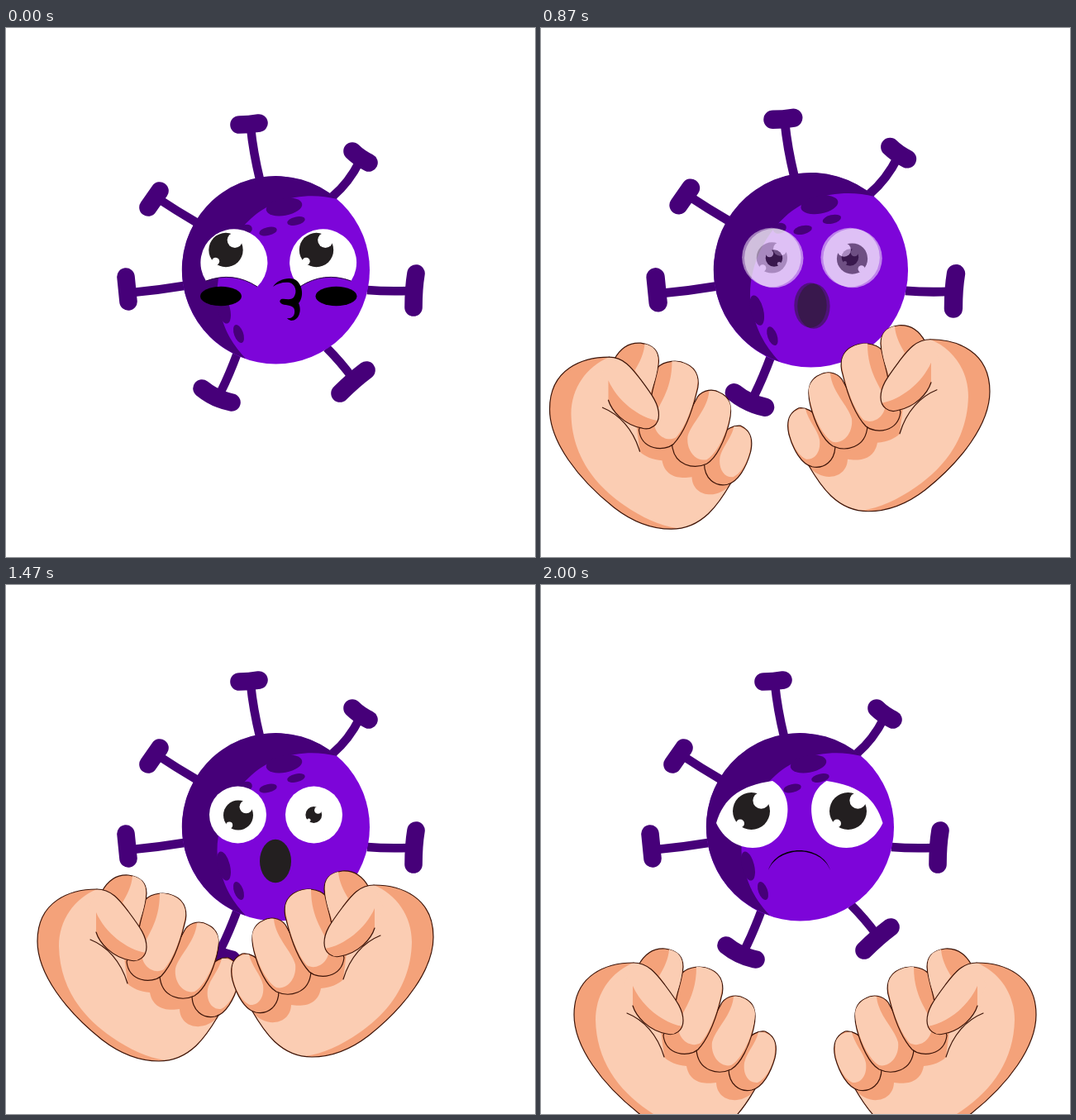
An HTML page that plays this animation: 640x640 px, repeating every 3.01 s.

```html
<!DOCTYPE html>
<html lang="en">
<head>
<meta charset="utf-8">
<title>Virus and fists</title>
<style>
  html, body { margin: 0; width: 100%; height: 100%; overflow: hidden; background: #fff; }
  svg { display: block; width: 100%; height: 100%; }
  .light { fill: #fbcdb3; }
  .shade { fill: #f4a27a; }
  .line, .edged { stroke: #3d1408; stroke-width: 1.2; stroke-linecap: round; }
  .line { fill: none; }
  .dark { fill: #460079; }
  .ink { fill: #231f20; }
  .white { fill: #fff; }
  .stems, .caps { fill: none; stroke: #460079; }
  .stems { stroke-width: 10.5; }
  .caps { stroke-width: 21.6; stroke-linecap: round; }
</style>
</head>
<body>
<svg viewBox="0 0 640 640">
  <defs>
    <g id="fist">
      <path class="shade" d="M82 398C50 398 10 412 10 461C10 500 44 545 88 580C110 597 134 606 157 606C195 606 215 575 230 549L205 480L142 430Z"/>
      <path class="light" d="M82 398C55 409 36 435 36 467C37 515 62 551 100 577C122 592 143 602 165 605C195 604 213 578 229 551C215 571 183 568 182 543C170 545 150 545 146 523C135 522 124 518 119 512L110 440Z"/>
      <path class="line" d="M82 398C50 398 10 412 10 461C10 500 44 545 88 580C110 597 134 606 157 606C195 606 215 575 230 549"/>

      <path class="shade edged" d="M217 495C223 485 232 480 241 481C254 487 256 500 253 513C248 531 238 549 225 552C210 555 197 545 197 526Z"/>
      <path class="light" d="M233 482C238 481 254 485 253 500C254 516 244 538 232 543C221 544 214 533 216 519C219 506 230 496 233 482Z"/>

      <path class="shade edged" d="M189 446C196 437 208 436 216 441C230 447 231 462 227 478C222 498 212 520 200 527C185 534 160 530 158 503Z"/>
      <path class="light" d="M203 439C212 437 229 446 229 460C228 482 214 514 200 522C186 525 175 510 177 494C181 478 201 462 203 439Z"/>

      <path class="shade edged" d="M140 411C149 402 165 401 175 406C190 412 192 428 188 440C182 465 172 490 160 503C148 513 121 510 118 486Z"/>
      <path class="light" d="M158 403C172 402 190 411 189 428C186 451 175 482 163 495C151 502 135 491 136 473C141 455 158 440 158 403Z"/>

      <path class="shade edged" d="M88 401C95 388 105 380 120 381C135 383 142 391 142 403C141 418 135 432 133 446Z"/>
      <path class="light" d="M125 382C135 384 142 391 141 403C141 418 135 432 132 442L113 414C119 404 124 394 125 382Z"/>

      <path class="light" d="M82 398C100 398 110 412 120 425C135 445 142 455 142 468C142 480 132 487 122 484C100 480 85 463 81 450L70 425Z"/>
      <path class="shade" d="M81 426C92 451 118 471 141 475C139 483 131 487 122 484C100 480 85 463 81 450Z"/>
      <path class="line" d="M82 398C100 398 110 412 120 425C135 445 142 455 142 468C142 480 132 487 122 484C100 480 85 463 81 450M74 459C94 467 111 485 119 512"/>
    </g>

    <g id="pupil">
      <circle class="ink" r="18"/>
      <circle class="white" cx="9.5" cy="-10.2" r="8"/>
      <circle class="white" cx="-10.8" cy="12" r="4"/>
    </g>
    <g id="kissEye">
      <path class="white" d="M242 306A40.500 40.500 0 1 1 304 313Q275 294 242 306Z"/>
      <path d="M242 306Q275 294 304 313" fill="none" stroke="#250040"/>
      <ellipse cx="260" cy="324.500" rx="25" ry="11.700"/>
    </g>
    <path id="sadEye" class="white" d="M212 288C222 254 246 242 280 237C295 246 300 262 298 278C296 300 280 318 256 318C238 318 221 307 212 288Z"/>
    <g id="shock">
      <circle class="white" cx="280.500" cy="278" r="34.500"/>
      <circle class="white" cx="372.500" cy="278" r="34.500"/>
      <use href="#pupil" transform="translate(281 278.500)"/>
      <use href="#pupil" transform="translate(372.300 278) scale(.55)"/>
      <ellipse class="ink" cx="326" cy="334" rx="19" ry="26.300"/>
    </g>
  </defs>

  <g id="virus">
    <path class="stems" d="M307 183Q299 150 296 120M395 204Q415 187 428 161M230 235Q206 221 185 207M215 312Q185 317 153 320M437 317Q460 319 488 318M280 393Q270 420 260 440M388 387Q405 404 419 423"/>
    <path class="caps" d="M282 117Q294 117 306 115M419 149Q427 157 439 163M186 197L172 217M145 301L148 331M496 297Q493 315 493 338M237 436Q253 449 273 453M436 414Q420 426 404 442"/>
    <circle cx="326.500" cy="293" r="113.500" fill="#7d05d9"/>
    <path class="dark" d="M401 207A113.500 113.500 0 1 0 290 400C270 378 265 364 260 348C248 316 260 263 297 230C322 207 362 197 401 207Z"/>
    <g class="dark">
      <ellipse rx="22" ry="10.500" transform="translate(336.500 216.500) rotate(-10)"/>
      <ellipse rx="11" ry="5" transform="translate(317 246) rotate(-13)"/>
      <ellipse rx="11" ry="5" transform="translate(351 233.500) rotate(-13)"/>
      <ellipse rx="8" ry="6" transform="translate(290 244) rotate(-20)"/>
      <ellipse rx="7.500" ry="18" transform="translate(263.500 340) rotate(-14)"/>
      <ellipse rx="5.500" ry="11.500" transform="translate(281.500 370) rotate(-20)"/>
    </g>

    <g id="kiss">
      <use href="#kissEye"/>
      <use href="#kissEye" transform="translate(659.500 0) scale(-1 1)"/>
      <use href="#pupil" transform="translate(266 268.500) scale(1.150)"/>
      <use href="#pupil" transform="translate(375.500 268.500) scale(1.150)"/>
      <path d="M323 313C328 305 340 301 349 304C359 309 361 325 354 333C358 341 355 354 345 354Q341 353 340 351C346 352 350 348 349 341C348 335 340 336 334 334Q329 331 333 328C338 327 344 330 348 326C353 319 350 310 343 308C336 307 328 309 323 313Z"/>
    </g>
    <use id="shockLeft" href="#shock"/>
    <use id="shockRight" href="#shock" transform="translate(655.800 1) scale(-1 1)"/>
    <g id="sad" transform="translate(13 0)">
      <use href="#sadEye"/>
      <use href="#sadEye" transform="translate(625.500 0) scale(-1 1)"/>
      <use href="#pupil" transform="translate(254.500 273.500) scale(1.250)"/>
      <use href="#pupil" transform="translate(371.500 273.500) scale(1.250)"/>
      <path d="M275 345C285 313 340 313 350 345C338 315 288 315 275 345Z"/>
    </g>
  </g>

  <g id="fists">
    <use id="leftFist" href="#fist"/>
    <use id="rightFist" href="#fist"/>
  </g>
</svg>
<script>
  const LOOP = 3010, APPEAR = 600, SHOCK = 630, SAD = 2000;
  const el = id => document.getElementById(id);
  const show = (id, opacity) => el(id).setAttribute("opacity", Number(opacity));
  const move = (id, transform) => el(id).setAttribute("transform", transform);

  // Linear progress from 0 to 1 between two times.
  const ramp = (t, from, to) => Math.min(1, Math.max(0, (t - from) / (to - from)));

  function draw(t) {
    const nudge = ramp(t, 1530, 1630);
    const fall = ramp(t, 1670, SAD);
    const shocked = t >= SHOCK && t < SAD;

    // The virus swells while its shocked face fades into the mirrored one.
    const swell = t < SAD
      ? ramp(t, 800, 940) - ramp(t, 1310, 1430) + ramp(t, 1670, 1850) : 0;
    const x = 326.5 + 6.5 * nudge - 19.5 * fall;
    move("virus", `translate(${x} 293) scale(${1 + .07 * swell}) translate(-326.5 -293)`);
    show("kiss", t < SHOCK);
    show("shockLeft", shocked * (1 - swell));
    show("shockRight", shocked * swell);
    show("sad", t >= SAD);

    // Two rounds of punches, right before left.
    const right = ramp(t, SHOCK, 813) - ramp(t, 813, 1070) + ramp(t, 1130, 1330) - nudge;
    const left = ramp(t, 825, 965) - ramp(t, 965, 1070) + ramp(t, 1330, 1470);
    show("fists", t >= APPEAR);
    move("leftFist", `translate(${-13 + 41 * left + 6 * nudge - 4 * fall}
      ${15 - 45 * left - 12 * nudge + 101 * fall})`);
    move("rightFist", `translate(${642 - 115 * right - 33 * fall}
      ${26 - 61 * right + 33 * fall}) scale(-1 1)`);
  }

  const start = performance.now();
  function tick() {
    draw((performance.now() - start) % LOOP);
    requestAnimationFrame(tick);
  }
  tick();
</script>
</body>
</html>
```
